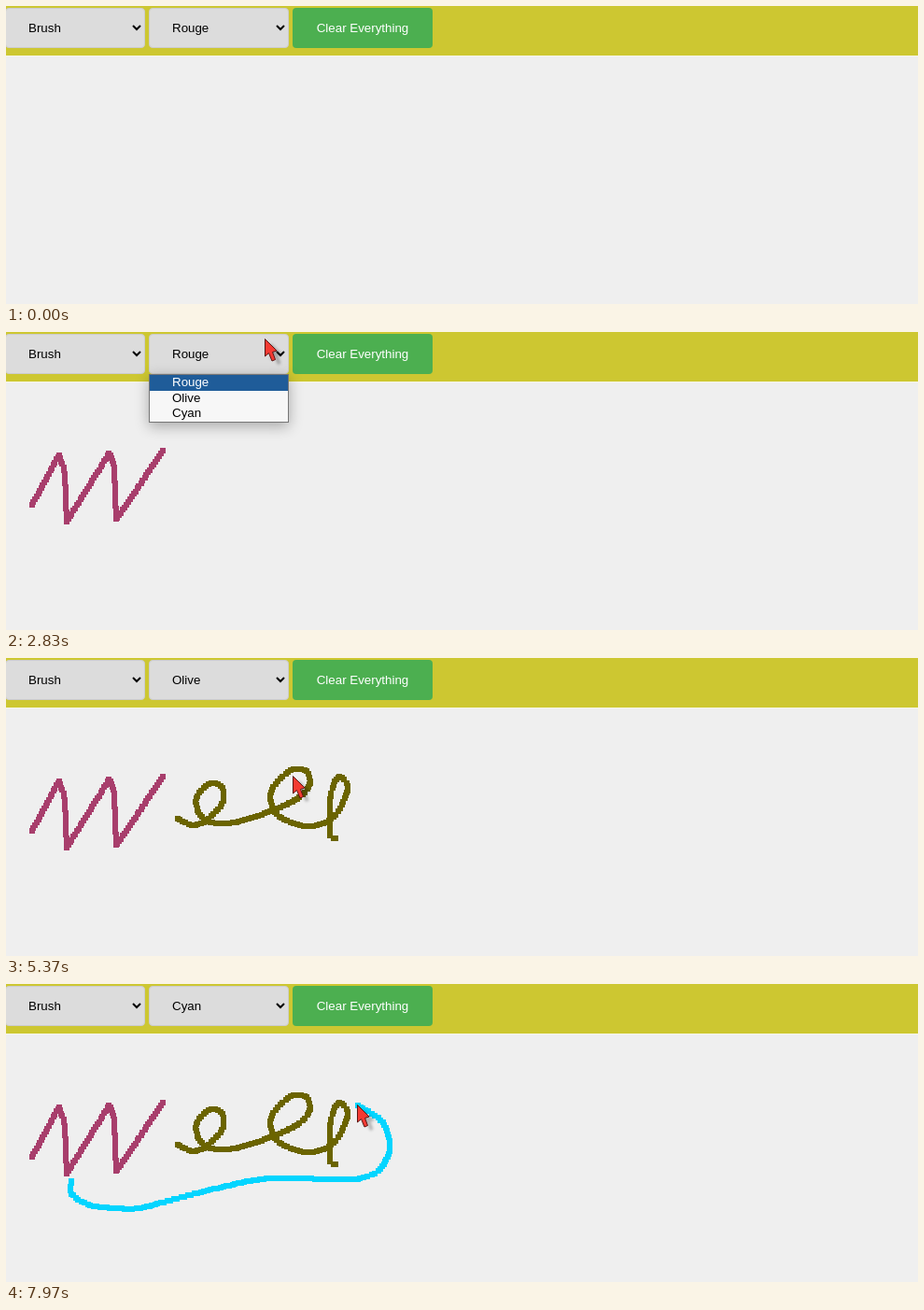
An HTML page with a canvas for the animation above (8 s loop, 977x319 px).

```html
<!DOCTYPE html>
<html lang="en">
<head>
<meta charset="utf-8">
<title>Paint</title>
<style>
  html, body { margin: 0; width: 100%; height: 100%; overflow: hidden; background: #efefef; }
  body { position: relative; font: 13.333px "Liberation Sans", Arial, sans-serif; }
  body > * { position: absolute; box-sizing: border-box; pointer-events: none; }
  header { top: 0; width: 100%; height: 54px; background: #cdc731; border-bottom: 1px solid #f7f6e2; }
  select, button { top: 2px; width: 150px; height: 43px; margin: 0; border-radius: 4px; font: inherit; }
  select { padding: 12px 20px; border: 1px solid #ccc; background: #dcdcdc; color: #000; }
  select.focus { outline: -webkit-focus-ring-color auto 1px; }
  #tool { left: -1px; }
  #colour, #menu { left: 153px; }
  button { left: 307px; padding: 0; border: 0; background: #4caf50; color: #fff; }
  #menu { top: 45px; width: 150px; height: 52px; border: 1px solid #767676; background: #f7f7f7;
    box-shadow: 0 4px 14px rgba(0, 0, 0, .3); }
  #menu div { padding-left: 24px; line-height: 16.67px; }
  #menu .on { background: #1f5c99; color: #fff; }
  canvas { left: 0; top: 0; }
</style>
</head>
<body>
<header></header>
<select id="tool" tabindex="-1"><option>Brush</option></select>
<select id="colour" tabindex="-1"><option>Rouge</option><option>Olive</option><option>Cyan</option></select>
<button tabindex="-1">Clear Everything</button>
<div id="menu"><div>Rouge</div><div>Olive</div><div>Cyan</div></div>
<canvas id="stage" width="977" height="319"></canvas>
<script>
const LOOP = 8000, BRUSH = 6, GAP = 3.5;
const rouge = { color: '#a83e6c', round: false };
const olive = { color: '#6b6400', round: true };
const cyan = { color: '#04d5ff', round: true };

const colour = document.getElementById('colour');
const menu = document.getElementById('menu');
const c = document.getElementById('stage').getContext('2d');

// Each move goes on from where the one before ended; with ink it leaves a stroke
const moves = [
  move(200, 200, [[134, 8]]),
  move(200, 400, [[45, 146]]),
  move(600, 730, [[28, 185]]),
  move(730, 1400, [[57, 131], [63, 150], [65, 203]], rouge),
  move(1430, 2100, [[111, 129], [116, 145], [118, 201], [168, 127]], rouge),
  move(2330, 2700, [[278, 8]]),
  move(2830, 2970, [[281, 57]]),
  move(3130, 3130, [[219, 72]]),
  move(3300, 3430, [[220, 106]]),
  move(3630, 3800, [[184, 172]]),
  move(3800, 4170, [[200, 179], [216, 173], [232, 155], [231, 138], [217, 135], [204, 149], [205, 163]], olive),
  move(4170, 4430, [[216, 175], [245, 176], [283, 164], [315, 149], [326, 134]], olive),
  move(4470, 5230, [[322, 121], [304, 121], [284, 143], [291, 168], [322, 180], [350, 171],
    [366, 141], [357, 127], [348, 146], [347, 188], [353, 193]], olive),
  move(5370, 5370, [[308, 127]]),
  move(5470, 5750, [[285, 30]]),
  move(5850, 6170, [[253, 73]]),
  move(6270, 6370, [[240, 87]]),
  move(6550, 7070, [[92, 202]]),
  move(7170, 7270, [[70, 211]]),
  move(7270, 7970, [[70, 224], [88, 236], [118, 240], [147, 239], [220, 220], [285, 208],
    [380, 208], [409, 184], [405, 150], [377, 130]], cyan)
];

function move(start, end, stops, ink) {
  const from = move.last || stops[0];
  move.last = stops[stops.length - 1];
  return { start, end, ink, path: trace([from, ...stops], ink && ink.round) };
}

// Points about one pixel apart along straight or rounded segments
function trace(pts, round) {
  const path = [pts[0]];
  for (let i = 1; i < pts.length; i++) {
    const p = pts[i - 1], q = pts[i];
    const before = pts[i - 2] || p, after = pts[i + 1] || q;
    const steps = Math.ceil(Math.hypot(q[0] - p[0], q[1] - p[1]));
    for (let s = 1; s <= steps; s++) {
      const u = s / steps;
      path.push([0, 1].map(k => round
        ? spline(before[k], p[k], q[k], after[k], u)
        : p[k] + (q[k] - p[k]) * u));
    }
  }
  return path;
}

function spline(a, b, d, e, u) {
  return b + u / 2 * (d - a + u * (2 * a - 5 * b + 4 * d - e + u * (3 * (b - d) + e - a)));
}

function stamp([x, y]) {
  c.fillRect(Math.round(x) - BRUSH / 2, Math.round(y) - BRUSH / 2, BRUSH, BRUSH);
}

function pointer([x, y], pressed) {
  c.save();
  c.translate(Math.round(x) - 1, Math.round(y) - 1);
  c.beginPath();
  [[.5, .5], [.5, 19], [4.5, 15.5], [8, 24], [11.5, 22.5], [8.5, 14.5], [13, 13]].forEach(p => c.lineTo(...p));
  c.closePath();
  Object.assign(c, { shadowColor: 'rgba(0,0,0,.25)', shadowBlur: 3, shadowOffsetX: 6, shadowOffsetY: 4 });
  c.fillStyle = pressed ? '#e3211b' : '#f43a32';
  c.fill();
  c.shadowColor = 'transparent';
  c.strokeStyle = '#5a1512';
  c.stroke();
  c.restore();
}

function draw(t) {
  const within = (a, b) => t >= a && t < b;
  const step = (a, b) => (t >= a) + (t >= b);

  colour.selectedIndex = step(3370, 6470);
  colour.classList.toggle('focus', within(3370, 3800) || within(6470, 7270));
  menu.hidden = !(within(2800, 3370) || within(5800, 6470));
  menu.style.display = menu.hidden ? 'none' : '';
  [...menu.children].forEach((row, i) => row.classList.toggle('on', i === step(3300, 6300)));

  c.clearRect(0, 0, 977, 319);
  let tip, pressed;
  for (const { start, end, ink, path } of moves) {
    if (t < start) break;
    const done = t >= end ? 1 : (t - start) / (end - start);
    const reach = Math.round((path.length - 1) * done);
    tip = path[reach];
    pressed = ink && done < 1;
    if (!ink) continue;
    c.fillStyle = ink.color;
    for (let d = 0; d < reach; d += GAP) stamp(path[Math.floor(d)]);
    stamp(tip);
  }
  if (tip) pointer(tip, pressed);
}

function frame() {
  draw(performance.now() % LOOP);
  requestAnimationFrame(frame);
}
frame();
</script>
</body>
</html>
```
